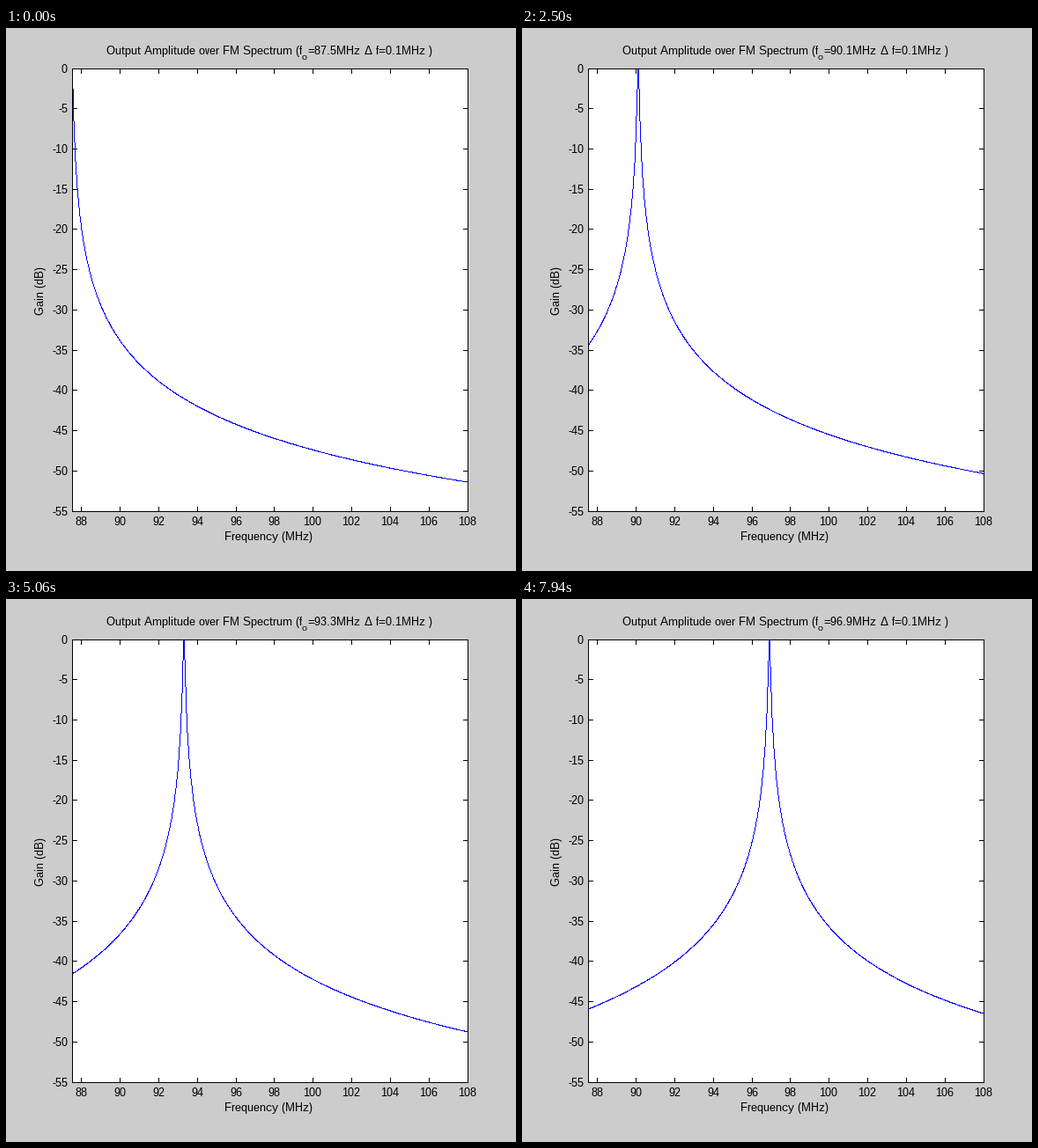
Animation, 579 px wide and 617 px high, one loop 8000 ms. Source, as a matplotlib script:

```python
import numpy as np
import matplotlib.pyplot as plt
from matplotlib.animation import FuncAnimation
from matplotlib.collections import LineCollection
from matplotlib.patches import Rectangle

W, H, DPI = 579, 617, 64
PX = 72 / DPI                                   # points per pixel
LEFT, RIGHT, TOP, BOTTOM = 75, 524, 46, 549
F_MIN, F_MAX, G_MIN = 87.5, 108.0, -55.0
BANDWIDTH = 0.1
TICK = 5
LOOP, INTERVAL = 8000, 20                       # ms
HOLD, STEP = 500, 80                            # first pause, then one move per step

plt.rcParams.update({
    "font.family": "Liberation Sans",
    "text.hinting": "default",
    "text.hinting_factor": 1,
})

fig = plt.figure(figsize=(W / DPI, H / DPI), dpi=DPI, facecolor="#cccccc")
ax = fig.add_axes([0, 0, 1, 1])
ax.set_xlim(0, W)
ax.set_ylim(H, 0)
ax.axis("off")


def to_x(freq):
    return np.floor(LEFT + (freq - F_MIN) / (F_MAX - F_MIN) * (RIGHT - LEFT) + 1e-6)


def to_y(gain):
    return np.floor(TOP + gain / G_MIN * (BOTTOM - TOP) + 1e-6)


def label(x, y, s, ha="left", size=13, **kw):
    return ax.text(x, y, s, ha=ha, va="baseline", fontsize=size * PX,
                   color="black", **kw)


def box(zorder, **kw):
    # snapping moves the edge onto the centre of pixel (LEFT, TOP)
    ax.add_patch(Rectangle((LEFT + .2, TOP + .2), RIGHT - LEFT, BOTTOM - TOP,
                           aa=False, snap=True, zorder=zorder, **kw))


# Plot area with inward ticks on all four sides; its edge covers the curve
box(1, fc="white", ec="none")
box(4, fc="none", ec="black", lw=PX)
ticks = []
for freq in range(88, 109, 2):
    x = to_x(freq)
    ticks += [[(x, TOP), (x, TOP + TICK)], [(x, BOTTOM - TICK), (x, BOTTOM)]]
    label(x, 565, str(freq), "center")
for gain in range(0, -56, -5):
    y = to_y(gain)
    ticks += [[(LEFT, y), (LEFT + TICK, y)], [(RIGHT - TICK, y), (RIGHT, y)]]
    label(70, y + 5, str(gain), "right")
ax.add_collection(LineCollection(np.array(ticks) + .2, colors="black",
                                 linewidths=PX, antialiaseds=False,
                                 snap=True, zorder=2), autolim=False)

label(298.5, 582, "Frequency (MHz)", "center")
label(43, 298.5, "Gain (dB)", "center", rotation=90, rotation_mode="anchor")

label(114, 30, "Output Amplitude over FM Spectrum (f")
label(336, 36, "o", size=10)
tuned = label(342, 30, "")
label(407, 30, "\u0394")
label(420, 30, "f=0.1MHz )")

curve, = ax.plot([], [], ",", color="#0000ff", zorder=3)
freqs = np.linspace(F_MIN, F_MAX, 2051)


def response(f0):
    """Band-pass gain in dB of a resonator tuned to f0."""
    q = f0 / BANDWIDTH
    return -10 * np.log10(1 + (q * (freqs / f0 - f0 / freqs)) ** 2)


def trace(x, y):
    """Hard-edged one-pixel line through the given pixels."""
    reach = np.maximum(abs(np.diff(x)), abs(np.diff(y)))
    s = np.concatenate([[0], np.cumsum(reach)])
    t = np.arange(s[-1] + 1)
    px = np.floor(np.interp(t, s, x) + .5)
    py = np.floor(np.interp(t, s, y) + .5)
    # pixel markers are painted in the row above their rounded position
    return px + .25, py + .75


def update(i):
    t = i * INTERVAL
    step = 0 if t < HOLD else (t - HOLD) // STEP + 1
    f0 = F_MIN + step / 10
    curve.set_data(*trace(to_x(freqs), to_y(response(f0))))
    tuned.set_text(f"={f0:.1f}MHz")
    return curve, tuned


anim = FuncAnimation(fig, update, frames=LOOP // INTERVAL, interval=INTERVAL,
                     repeat=True, repeat_delay=0, blit=False)
plt.show()
```
